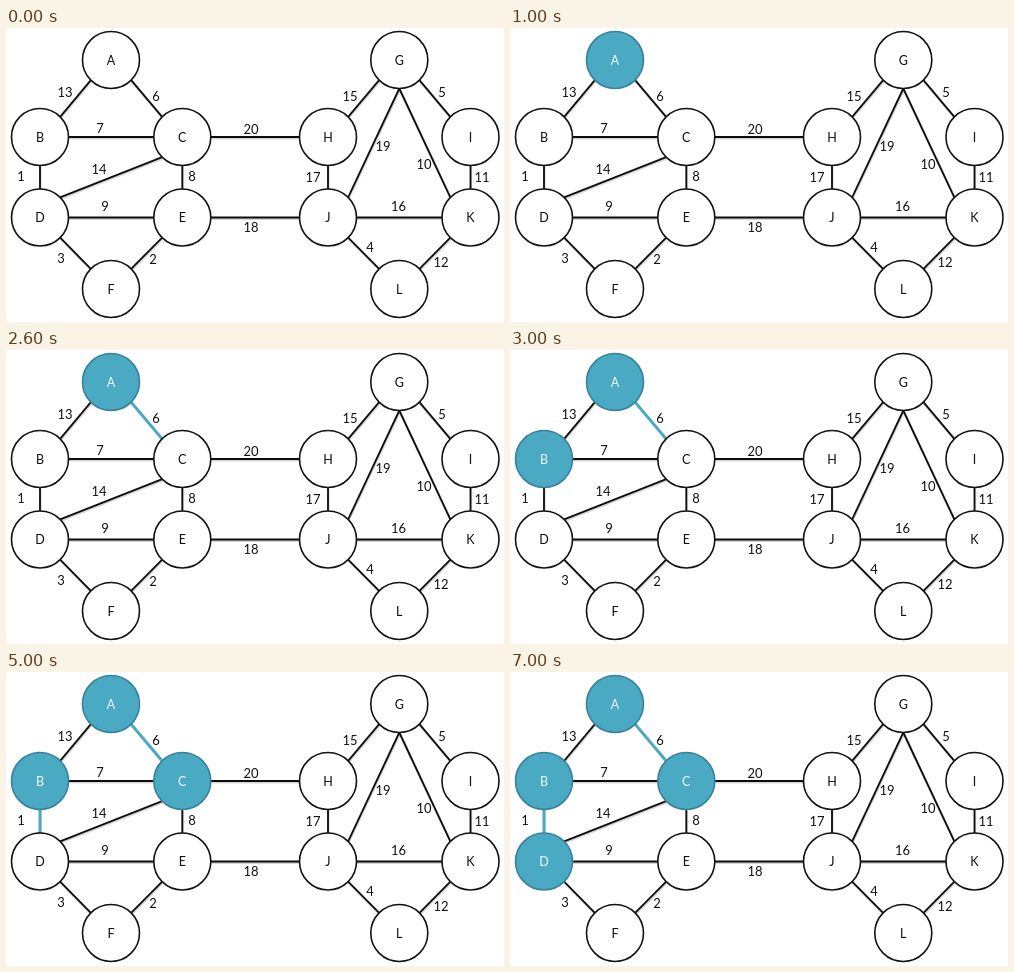
An HTML page for the animation above (8 s loop, 498 px wide and 294 px high).

```html
<!DOCTYPE html>
<html lang="en">
<head>
<meta charset="utf-8">
<title>Spanning tree steps</title>
<style>
  html, body { margin: 0; width: 100%; height: 100%; overflow: hidden; background: #fff; }
  svg { display: block; width: 498px; height: 294px; }
  text { font-family: Lato, Carlito, "Open Sans", sans-serif; font-size: 13px; text-anchor: middle; fill: #111; }
  .edge { stroke: #0c0c0c; stroke-width: 1.8; }
  .shade { stroke: #000; stroke-opacity: .16; stroke-width: 2.4; }
  .edge.on { stroke: #4aa9c3; stroke-width: 3; }
  circle { fill: #fff; stroke: #111; stroke-width: 1.6; }
  .name { font-size: 12.5px; }
  .on circle { fill: #4aa9c3; stroke: #38819a; }
  .on .name { fill: #f4fbfd; }
</style>
</head>
<body>
<svg id="stage" viewBox="0 0 498 294"></svg>
<script>
const LOOP = 8000, R = 28.5, DIAG = R * Math.SQRT1_2;

const nodes = {
  A: [105, 32], B: [34, 109], C: [176.3, 109], D: [34, 189.5], E: [176.3, 189.5], F: [105, 261],
  G: [393.3, 32], H: [322, 109], I: [464.5, 109], J: [322, 189.5], K: [464.5, 189.5], L: [393.3, 261]
};

// edge, weight, label centre
const edges = [
  ['AB', 13, 59, 64.5], ['AC', 6, 150, 68.5], ['BC', 7, 94, 100.5], ['CD', 14, 93, 141],
  ['BD', 1, 15, 148.5], ['CE', 8, 186, 148.5], ['DE', 9, 99, 178.5], ['DF', 3, 55, 230],
  ['EF', 2, 147, 231], ['CH', 20, 245, 101], ['EJ', 18, 245, 199.5], ['GH', 15, 344, 68.5],
  ['GI', 5, 436, 64.5], ['GJ', 19, 377, 118], ['GK', 10, 418, 136], ['HJ', 17, 307, 149],
  ['IK', 11, 476, 149], ['JK', 16, 392.5, 178], ['JL', 4, 364, 219], ['KL', 12, 435, 234]
];

// time at which each part turns blue
const steps = { A: 1000, AC: 2000, B: 3000, BD: 4000, C: 5000, D: 7000 };

const stage = document.getElementById('stage');
const parts = {};

function add(parent, tag, attrs, content) {
  const el = document.createElementNS('http://www.w3.org/2000/svg', tag);
  for (const key in attrs) el.setAttribute(key, attrs[key]);
  if (content !== undefined) el.textContent = content;
  parent.appendChild(el);
  return el;
}

// Edges attach at the eight compass points of a node.
function port(from, to) {
  const [x, y] = nodes[from], [u, v] = nodes[to];
  const dx = Math.sign(u - x), dy = Math.sign(v - y);
  if (from === 'G' && 'JK'.includes(to)) return [x, y + R];
  const d = dx && dy ? DIAG : R;
  return [x + dx * d, y + dy * d];
}

for (const [id, weight, x, y] of edges) {
  const [x1, y1] = port(id[0], id[1]), [x2, y2] = port(id[1], id[0]);
  add(stage, 'line', { class: 'shade', x1: x1 + .5, y1: y1 + 1.2, x2: x2 + .5, y2: y2 + 1.2 });
  parts[id] = add(stage, 'line', { class: 'edge', x1, y1, x2, y2 });
  add(stage, 'text', { x, y: y + 4.6 }, weight);
}

for (const id in nodes) {
  const [x, y] = nodes[id];
  const group = parts[id] = add(stage, 'g', {});
  add(group, 'circle', { cx: x, cy: y, r: R });
  add(group, 'text', { class: 'name', x, y: y + 4.7 }, id);
}

const start = performance.now();
function draw(now) {
  const t = Math.max(0, now - start) % LOOP;
  for (const id in steps) parts[id].classList.toggle('on', t >= steps[id]);
  requestAnimationFrame(draw);
}
draw(start);
</script>
</body>
</html>
```
